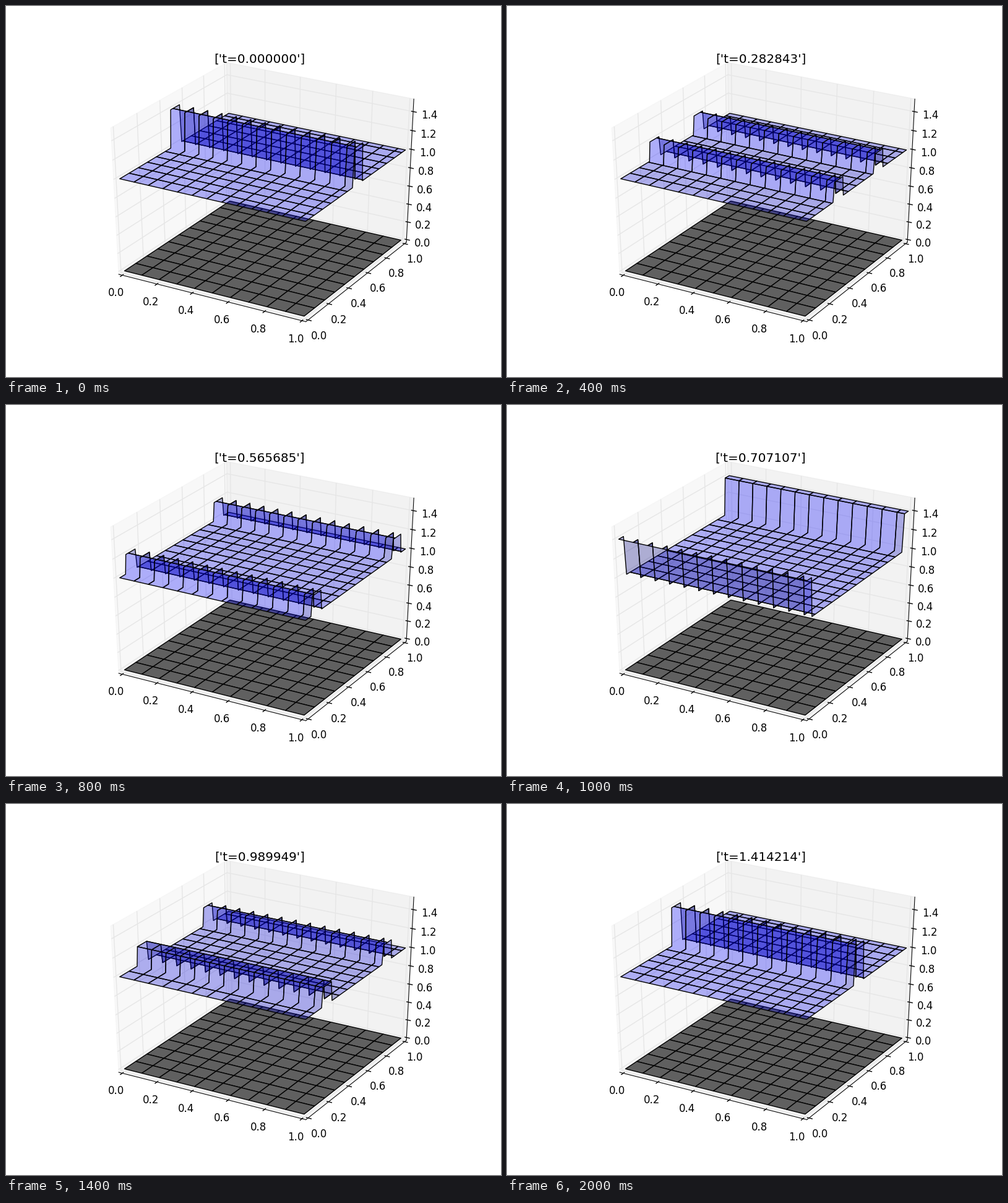
Animation, 800 px wide and 600 px high, one loop 2.2 s. Source, as a matplotlib script:

```python
import numpy as np
import matplotlib.pyplot as plt
from matplotlib.animation import FuncAnimation
from matplotlib.collections import LineCollection, PolyCollection
from matplotlib.patches import Polygon

W, H, DPI = 800, 600, 100
FRAMES, INTERVAL = 11, 200
N = 100                        # grid cells per side
SCALE = np.array([1, 1, 1.5])  # axis ranges
DIST, ELEV, AZIM = 10, np.radians(30), np.radians(-60)
LO, HI = -1 / 48, 1 + 1 / 48   # box is slightly larger than the data
DELTA = 1 / 12
LIGHT = np.array([-1, -1, 0.5])

plt.rcParams["font.family"] = "DejaVu Sans"

ce, se, ca, sa = np.cos(ELEV), np.sin(ELEV), np.cos(AZIM), np.sin(AZIM)
TOWARD = np.array([ce * ca, ce * sa, se])
RIGHT = np.array([-sa, ca, 0])
UP = np.cross(TOWARD, RIGHT)


def project(points):
    """Unit-cube points -> pixel positions (y up) and distance from the eye."""
    d = np.asarray(points, float) - 0.5
    dist = DIST - d @ TOWARD
    x = 100 + 620 * (d @ RIGHT / dist + 0.095) / 0.185
    y = 60 + 480 * (d @ UP / dist + 0.095) / 0.185
    return np.stack([x, y], axis=-1), dist


def pixels(*points):
    return project(points)[0]


def patches(step):
    """Row and column indices around each patch of the grid."""
    loops = []
    for r in range(0, N, step):
        for c in range(0, N, step):
            r2, c2 = min(r + step, N), min(c + step, N)
            across, along = np.arange(c, c2 + 1), np.arange(r, r2 + 1)
            rows = np.r_[np.full(len(across), r), along[1:],
                         np.full(len(across) - 1, r2), along[-2::-1]]
            cols = np.r_[across, np.full(len(along) - 1, c2),
                         across[-2::-1], np.full(len(along) - 1, c)]
            loops.append((rows, cols))
    return loops


def surface(loops, height):
    """Projected patches from far to near, with their light values."""
    items = []
    for rows, cols in loops:
        p = np.column_stack([cols / N, rows / N, height[rows]])
        n = len(p)
        a, b, c = p[0], p[n // 3], p[2 * n // 3]
        normal = np.cross(a - b, b - c)
        light = normal @ LIGHT / np.linalg.norm(normal)
        xy, dist = project(p / SCALE)
        items.append((np.mean(-DIST / dist), xy, light))
    items.sort(key=lambda it: it[0], reverse=True)
    return [it[1] for it in items], np.array([it[2] for it in items])


def wave(n):
    """Two half-height pulses leaving the middle, mirrored at both walls."""
    j = np.arange(N + 1)
    s = 10 * n
    centers = (50 + s, 50 - s, 150 - s, s - 50)
    return 1 + 0.2 * sum(abs(j - c) <= 4 for c in centers)


fig = plt.figure(figsize=(W / DPI, H / DPI), dpi=DPI, facecolor="white")
ax = fig.add_axes([0, 0, 1, 1])
ax.set_xlim(0, W)
ax.set_ylim(0, H)
ax.axis("off")


def draw_pane(axis, value, shade):
    corners = []
    for u, v in ((LO, LO), (HI, LO), (HI, HI), (LO, HI)):
        p = [u, v]
        p.insert(axis, value)
        corners.append(p)
    ax.add_patch(Polygon(pixels(*corners), closed=True, facecolor=str(shade),
                         edgecolor=str(shade), alpha=0.5, lw=1, zorder=1))


def with_value(point, axis, value):
    p = list(point)
    p[axis] = value
    return p


def draw_axis(i, edge, tick_axis, ticks):
    z = 2 + i * 0.1
    far = [LO, HI, LO]
    near = [HI, LO, HI]
    line = pixels(with_value(edge, i, LO), with_value(edge, i, HI))
    ax.plot(*line.T, color="k", lw=0.75, zorder=z)

    grid = []
    for t in ticks:
        mid = with_value(far, i, t)
        a, b = (i + 1) % 3, (i + 2) % 3
        grid.append(pixels(with_value(mid, a, near[a]), mid,
                           with_value(mid, b, near[b])))
    ax.add_collection(LineCollection(grid, colors="0.9", linewidths=1,
                                     zorder=z + 0.02), autolim=False)

    out = np.sign(edge[tick_axis] - 0.5) * DELTA
    for t in ticks:
        pos = with_value(edge, i, t)
        e = edge[tick_axis]
        mark = pixels(with_value(pos, tick_axis, e - 0.1 * out),
                      with_value(pos, tick_axis, e + 0.2 * out))
        ax.plot(*mark.T, color="k", lw=1, zorder=z + 0.04)
        label = [v if k == i else v + np.sign(v - 0.5) * 0.7 * DELTA
                 for k, v in enumerate(pos)]
        x, y = pixels(label)[0]
        ax.text(x, y, f"{t * SCALE[i]:.1f}", size=12, ha="center", va="top",
                zorder=6)


draw_pane(0, LO, 0.95)
draw_pane(1, HI, 0.90)
draw_pane(2, LO, 0.925)

fifths = np.arange(6) / 5
draw_axis(0, (0, LO, LO), 1, fifths)
draw_axis(1, (HI, 0, LO), 0, fifths)
draw_axis(2, (HI, HI, 0), 0, np.arange(8) / 5 / SCALE[2])

floor, _ = surface(patches(10), np.zeros(N + 1))
ax.add_collection(PolyCollection(floor, facecolors="0.375", edgecolors="k",
                                 linewidths=1, zorder=4), autolim=False)

water_loops = patches(8)
water = PolyCollection([], edgecolors="k", linewidths=1, zorder=5)
ax.add_collection(water, autolim=False)
title = ax.text(410, 60 + 0.92 * 480 + 5 * DPI / 72, "", size=14.4,
                ha="center", va="baseline", zorder=6)


def update(n):
    verts, light = surface(water_loops, wave(n))
    level = (light - light.min()) / np.ptp(light)
    colors = np.zeros((len(verts), 4))
    colors[:, 2] = 0.5 + 0.5 * level
    colors[:, 3] = 0.3
    water.set_verts(verts)
    water.set_facecolor(colors)
    title.set_text(f"['t={0.1 * n * np.sqrt(2):.6f}']")
    return water, title


anim = FuncAnimation(fig, update, frames=FRAMES, interval=INTERVAL,
                     init_func=lambda: update(0), repeat=True, repeat_delay=0)
plt.show()
```
